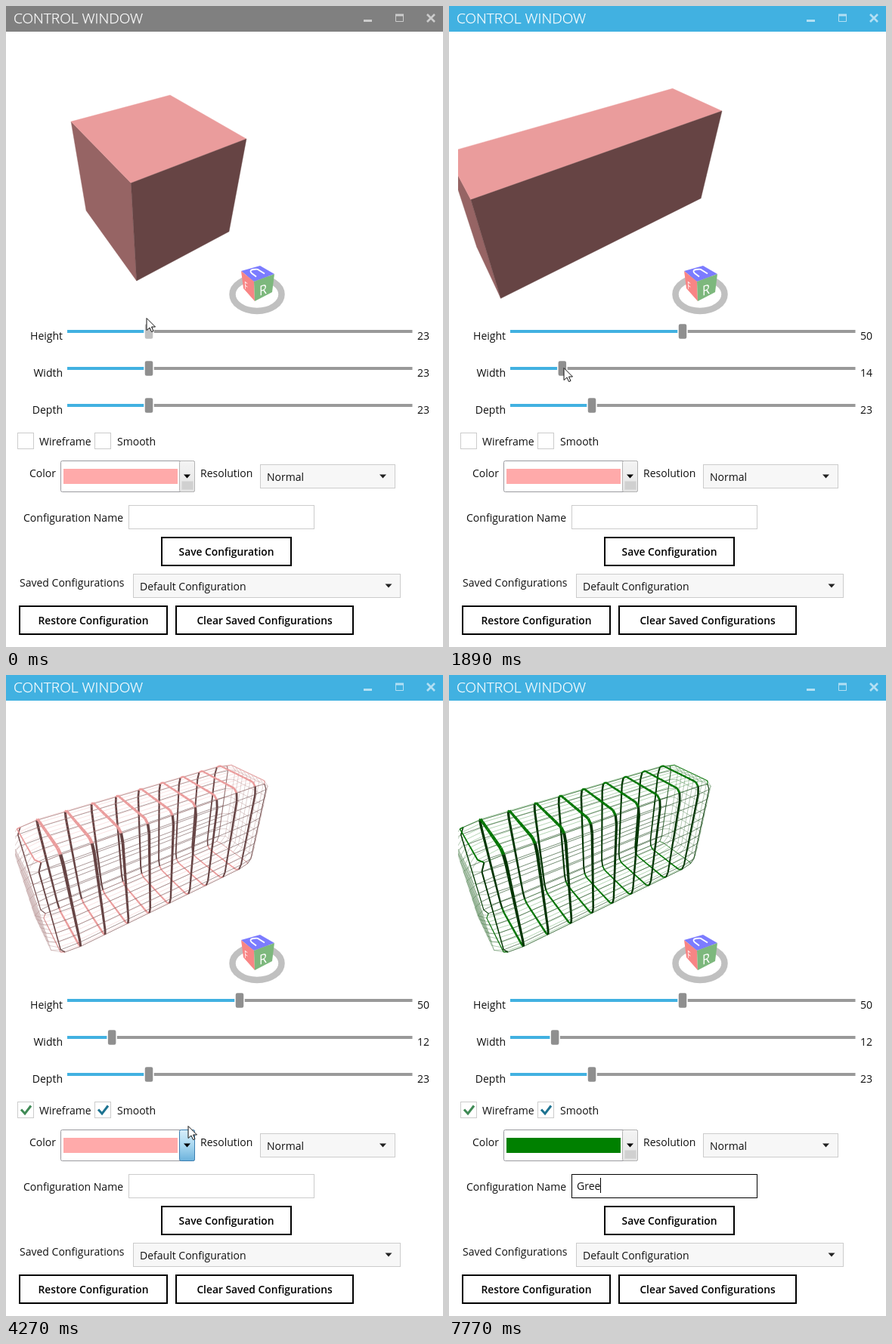
Recreate the animation shown at these times as an HTML page with a canvas. Size 578 by 849 pixels, loop 8 s.

```html
<!DOCTYPE html>
<html lang="en">
<head>
<meta charset="utf-8">
<title>Control window</title>
<style>
html, body { margin: 0; width: 578px; height: 849px; overflow: hidden; background: #fff; }
canvas, svg { position: absolute; left: 0; top: 0; }
text { font: 14px "Open Sans", "Noto Sans", sans-serif; fill: #111; white-space: pre; }
.title { font-size: 19.1px; font-weight: 300; fill: #fff; stroke: #fff; stroke-width: .25; }
.bold text { font-size: 13.8px; font-weight: 600; fill: #000; text-anchor: middle; }
.bold rect { fill: #fff; stroke: #000; stroke-width: 2; }
.right { text-anchor: end; }
.field { fill: #fff; stroke: #ccc; }
.list { fill: #f7f7f7; stroke: #ccc; }
.check { fill: none; stroke-width: 3; }
.cube text { fill: #fff; }
</style>
</head>
<body>
<canvas id="scene" width="578" height="420"></canvas>
<svg width="578" height="849">
  <defs>
    <linearGradient id="plain" x2="0" y2="1"><stop stop-color="#f4f4f4"/><stop offset="1" stop-color="#e4e4e4"/></linearGradient>
    <linearGradient id="lit" x2="0" y2="1"><stop stop-color="#d8eefa"/><stop offset=".5" stop-color="#a9d8f0"/><stop offset="1" stop-color="#6cb2dc"/></linearGradient>
    <path id="down" d="M-4.500 -2.500h9l-4.500 5z"/>
  </defs>
  <rect id="bar" width="578" height="34"/>
  <text class="title" x="10" y="23">CONTROL WINDOW</text>
  <g stroke="#fff" fill="none" opacity=".6">
    <path d="M473 19.500h11" stroke-width="3"/>
    <path d="M515.500 11v9.500h10V11"/><path d="M515 12h11" stroke-width="3"/>
    <path d="M557 11l10 10m0-10l-10 10" stroke-width="2.600"/>
  </g>

  <g class="cube">
    <ellipse cx="332" cy="382" rx="32.500" ry="22" fill="none" stroke="#c0c0c0" stroke-width="8.500"/>
    <path d="M311 351l25-7 19 11-27 10z" fill="#7c7cff"/>
    <path d="M311 351l17 14 1 26-15-17z" fill="#f88585"/>
    <path d="M328 365l27-10-3 24-23 12z" fill="#7db87d"/>
    <path d="M331 358.500L325 354Q321 350 327 349T334 349.500L342 354.500" fill="none" stroke="#fff" stroke-width="1.800"/>
    <text transform="matrix(.6 .45 .05 1 315.5 374)">F</text>
    <text transform="matrix(.9 -.3 0 1 335 384)" style="font-size:18px">R</text>
  </g>

  <g id="sliders"></g>

  <rect id="wireBox" class="field" x="15.500" y="565.500" width="21" height="21"/>
  <path id="wireTick" class="check" d="M20 575.500l5 5.500 8-10.500" stroke="#3f8a55"/>
  <text x="44" y="582">Wireframe</text>
  <rect id="smoothBox" class="field" x="117.500" y="565.500" width="21" height="21"/>
  <path id="smoothTick" class="check" d="M122 575.500l5 5.500 8-10.500" stroke="#1d7391"/>
  <text x="147" y="582">Smooth</text>

  <text x="31" y="624">Color</text>
  <rect x="72.500" y="602.500" width="177" height="41" rx="2" fill="#fff" stroke="#9a9a9f"/>
  <rect id="swatch" x="76" y="613" width="151" height="20"/>
  <rect id="drop" x="229.500" y="602.500" width="20" height="41" rx="2"/>
  <rect id="grip" x="232.500" y="629.500" width="15" height="11" fill="#d0d0d0"/>
  <use href="#down" x="239.500" y="623"/>
  <text x="257" y="624">Resolution</text>
  <rect class="list" x="336.500" y="607.500" width="178" height="31"/>
  <text x="345" y="629">Normal</text>
  <use href="#down" x="498.500" y="623" fill="#222"/>

  <text x="23" y="683">Configuration Name</text>
  <rect id="nameBox" class="field" x="162.500" y="661.500" width="245" height="31"/>
  <text id="name" x="169" y="682"></text>
  <path id="caret" d="M0 666v20" stroke="#000"/>
  <path id="beam" d="M252 667.500h3m1 0h3M255.500 668v14M252 682.500h3m1 0h3" stroke="#000" fill="none"/>

  <text x="18" y="769">Saved Configurations</text>
  <rect class="list" x="168.500" y="752.500" width="353" height="31"/>
  <text x="177" y="774">Default Configuration</text>
  <use href="#down" x="506" y="768" fill="#222"/>
  <g class="bold">
    <rect x="206" y="704" width="171" height="37"/><text x="291.500" y="728">Save Configuration</text>
    <rect x="18" y="795" width="195" height="37"/><text x="115.500" y="819">Restore Configuration</text>
    <rect x="225" y="795" width="234" height="37"/><text x="342" y="819">Clear Saved Configurations</text>
  </g>
  <path id="arrow" d="M0 .5V16.500L4 13L6.500 18.500L9 17.500L6.500 12H11.500Z" fill="#fff" stroke="#111"/>
</svg>
<script>
const LOOP = 8000, STEP = 70;
const $ = id => document.getElementById(id);
const ctx = $('scene').getContext('2d');
const set = (id, attrs) => { for (const k in attrs) $(id).setAttribute(k, attrs[k]); };
const show = (id, on) => set(id, { visibility: on ? 'visible' : 'hidden' });

function ease(t, from, to) {
  const f = Math.min(1, Math.max(0, (t - from) / (to - from)));
  return f * f * (3 - 2 * f);
}

// The pointer rests between moves: [from, to, x, y].
const moves = [
  [70, 280, 198, 429], [630, 980, 306, 432],      // height thumb
  [1190, 1470, 190, 483], [1540, 2030, 142, 478], // width thumb
  [2030, 2310, 22, 576], [2590, 2800, 162, 576],  // check boxes
  [3360, 3640, 240, 632], [4000, 4690, 242, 528], // colour list
  [4760, 5250, 219, 537], [5530, 5950, 268, 697],
  [5950, 6370, 258, 665]];                        // name field

function pointer(t) {
  let x = 186, y = 413;
  for (const [from, to, nx, ny] of moves) {
    const f = ease(t, from, to);
    x += (nx - x) * f;
    y += (ny - y) * f;
  }
  return [x, y].map(Math.round);
}

// Screen direction and depth gain of the three box axes, per half of size 23.
const centre = [196.8, 230.3];
const axes = [[63.05, -24.75, .0736], [-40.9, -37.8, .1152], [-.15, -59.55, -.1018]];

function project(p, half) {
  const [x, y, k] = [0, 1, 2].map(j => axes.reduce((sum, a, i) => sum + a[j] * p[i] * half[i], 0));
  return [centre[0] + x / (1 + k), centre[1] + y / (1 + k), 1 + k];
}

const shade = (rgb, f) => `rgb(${rgb.map(v => Math.round(v * f))})`;
const shades = [.59, .4, .917]; // by face normal

function point(normal, sign, a, u, b, v) {
  const p = [];
  p[normal] = sign; p[a] = u; p[b] = v;
  return p;
}
const others = normal => [0, 1, 2].filter(a => a !== normal);

function drawSolid(half, rgb) {
  for (const [normal, sign] of [[0, -1], [2, 1], [1, -1]]) {
    const [a, b] = others(normal);
    ctx.beginPath();
    for (let i = 0; i < 4; i++) {
      const u = i % 3 ? 1 : -1, v = i > 1 ? 1 : -1;
      const [x, y] = project(point(normal, sign, a, u, b, v), half);
      ctx.lineTo(x, y);
    }
    ctx.closePath();
    ctx.fillStyle = ctx.strokeStyle = shade(rgb, shades[normal]);
    ctx.lineWidth = .4;
    ctx.fill();
    ctx.stroke();
  }
}

// Pulls edges and corners of the unit cube inwards.
function soften(p) {
  const outer = p.filter(v => Math.abs(v) === 1).length;
  const f = 1 - .2 * (1 - 1 / Math.sqrt(outer));
  return p.map(v => Math.abs(v) === 1 ? v * f : v);
}

function drawWires(half, rgb, smooth) {
  const N = 10, grid = i => (2 * i - N) / N;
  // Back faces first.
  for (const [normal, sign] of [[2, -1], [1, 1], [0, 1], [0, -1], [2, 1], [1, -1]]) {
    const [p, q] = others(normal);
    ctx.strokeStyle = shade(rgb, shades[normal]);
    for (const [along, across] of [[p, q], [q, p]]) {
      const ring = normal !== 0 && along !== 0;
      for (let i = 0; i <= N; i++) {
        let last;
        for (let j = 0; j <= N; j++) {
          const v = point(normal, sign, along, grid(j), across, grid(i));
          const pt = project(smooth ? soften(v) : v, half);
          if (last) {
            const thick = (i % N ? 2.4 : 1) / pt[2] ** 2;
            ctx.lineWidth = ring ? thick : normal === 1 ? .55 : .3;
            ctx.beginPath();
            ctx.moveTo(last[0], last[1]);
            ctx.lineTo(pt[0], pt[1]);
            ctx.stroke();
          }
          last = pt;
        }
      }
    }
  }
}

$('sliders').innerHTML = ['Height', 'Width', 'Depth'].map((label, i) => {
  const y = 431 + 49 * i;
  return `<text class="right" x="75" y="${y + 11}">${label}</text>
    <rect x="81" y="${y - 2}" width="456.500" height="4" fill="#999"/>
    <rect id="fill${i}" x="81" y="${y - 2}" height="4" fill="#41b1e1"/>
    <rect id="thumb${i}" y="${y - 10.5}" width="12" height="21" rx="3" stroke="#fff" stroke-width="1.500"/>
    <text id="value${i}" x="544" y="${y + 11}"></text>`;
}).join('');

function draw(t) {
  const size = [23 + 27 * ease(t, 630, 1085), 23 - 11 * ease(t, 1540, 2030), 23];
  size.forEach((v, i) => {
    const x = 86.8 + 4.444 * v;
    set('fill' + i, { width: x - 81 });
    set('thumb' + i, { x: x - 6, fill: i === 0 && t < 490 ? '#c0c0c0' : '#8f8f8f' });
    $('value' + i).textContent = Math.round(v);
  });

  const rgb = t < 5670 ? [255, 170, 170] : [0, 128, 0];
  const half = size.map(v => v / 23);
  const wire = t >= 2660, smooth = t >= 3220;
  ctx.clearRect(0, 0, 578, 420);
  ctx.save();
  ctx.beginPath();
  ctx.rect(12, 34, 554, 386);
  ctx.clip();
  if (wire) drawWires(half, rgb, smooth);
  else drawSolid(half, rgb);
  ctx.restore();

  const open = t >= 3850 && t < 5670;
  set('bar', { fill: t < 700 ? '#808080' : '#41b1e1' });
  set('swatch', { fill: shade(rgb, 1) });
  set('drop', { fill: open ? 'url(#lit)' : 'url(#plain)', stroke: open ? '#3c7fb1' : '#b5b5b5' });
  show('grip', !open);
  show('wireTick', wire);
  show('smoothTick', smooth);
  $('wireBox').style.stroke = t >= 2520 && t < 2800 ? '#1d7391' : '#ccc';
  $('smoothBox').style.stroke = t >= 2800 && t < 3850 ? '#1d7391' : '#ccc';
  $('nameBox').style.stroke = t < 6230 ? '#ccc' : t < 6510 ? '#777' : '#000';

  const typed = Math.max(0, 1 + Math.floor((t - 7350) / 140));
  $('name').textContent = 'Gree'.slice(0, typed);
  const end = typed ? $('name').getComputedTextLength() : 0;
  set('caret', { transform: `translate(${Math.round(169 + end) + .5} 0)` });
  show('caret', t >= 7070);
  show('beam', t >= 6790 && t < 7350);

  set('arrow', { transform: `translate(${pointer(t)})` });
  show('arrow', t < 6510);
}

const start = performance.now();
let shown = -1;
function frame() {
  const t = Math.floor((performance.now() - start) % LOOP / STEP) * STEP;
  if (t !== shown) draw(shown = t);
  requestAnimationFrame(frame);
}
frame();
</script>
</body>
</html>
```
